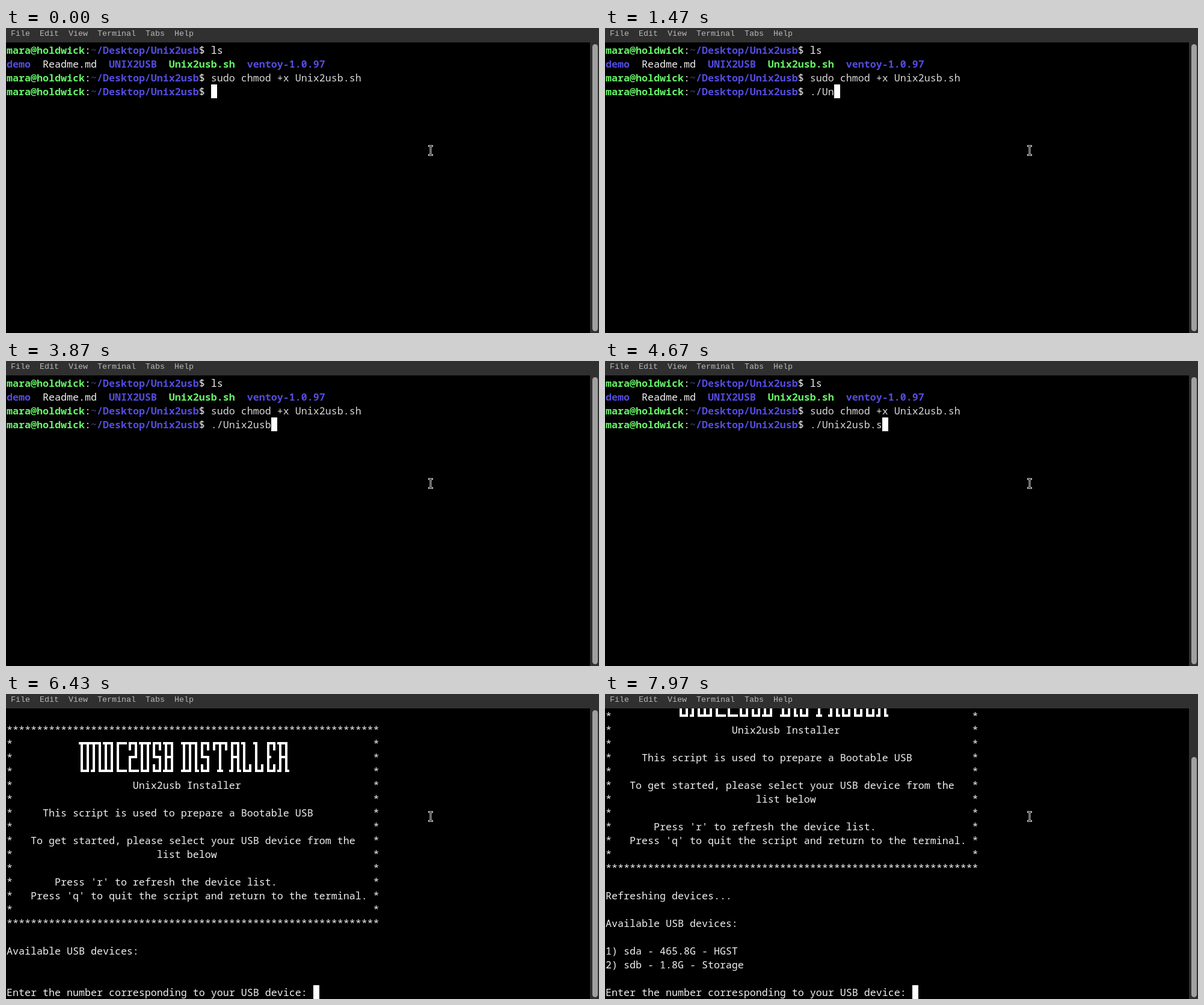
Recreate the animation shown at these times as an HTML page. Size 986 by 508 pixels, loop 8000 ms.

```html
<!DOCTYPE html>
<html lang="en">
<head>
<meta charset="utf-8">
<title>Terminal</title>
<style>
html, body { margin: 0; width: 100%; height: 100%; overflow: hidden; background: #303030; }
#stage { position: relative; width: 986px; height: 508px; overflow: hidden; }
#menu {
  position: absolute; left: 8px; top: 1px; margin: 0; color: #b8b8b8;
  font: 13.3333px/18px "Liberation Mono", monospace;
}
#term { position: absolute; left: 0; top: 24px; width: 971px; height: 484px; overflow: hidden; background: #000; }
#page { position: absolute; left: 1px; top: 1px; }
pre { margin: 0; color: #f0f0f0; font: 16.6667px/23px "Noto Sans Mono", monospace; font-variant-ligatures: none; }
pre div { height: 23px; }
b.user { color: #66f468; }
b.dir { color: #544ce0; }
i { font-style: normal; color: #d8d8d8; }
s { text-decoration: none; color: #484878; }
u { display: inline-block; width: 10px; height: 23px; vertical-align: top; background: #fff; }
#logo { position: absolute; left: 0; top: 46px; fill: none; stroke: #fff; stroke-width: 4; }
#thumb { position: absolute; left: 975px; width: 9px; border-radius: 4.5px; background: #a0a0a0; }
#mouse { position: absolute; left: 698px; top: 193px; fill: none; }
</style>
</head>
<body>
<div id="stage">
  <pre id="menu">File  Edit  View  Terminal  Tabs  Help</pre>
  <div id="term">
    <div id="page">
      <pre id="text"></pre>
      <svg id="logo" width="480" height="69"><path/></svg>
    </div>
  </div>
  <div id="thumb"></div>
  <svg id="mouse" width="16" height="22">
    <path d="M4 3.5H12M8 3.5V18.5M4 18.5H12" stroke="#d8d8d8" stroke-width="3"/>
    <path d="M5 3.5H11M8 3.5V18.5M5 18.5H11" stroke="#000"/>
  </svg>
</div>
<script>
const LOOP = 8000, LAUNCH = 5030, REFRESH = 7030;
const FIRST_KEY = 100, KEY_GAP = 400;
const COMMAND = './Unix2usb.sh';
const get = id => document.getElementById(id);

// Shell session
const dir = s => `<b class="dir">${s}</b>`;
const user = s => `<b class="user">${s}</b>`;
const prompt = user('mara@holdwick') + ':' + '<s>~</s>' + dir('/Desktop/Unix2usb') + '$ ';
const shell = typed => [
  prompt + 'ls',
  [dir('demo'), 'Readme.md', dir('UNIX2USB'), user('Unix2usb.sh'), dir('ventoy-1.0.97')].join('  '),
  prompt + '<i>sudo chmod +x Unix2usb.sh</i>',
  prompt + `<i>${typed}</i><u></u>`
];

// Installer screen
const stars = '*'.repeat(62);
const boxed = (col = 1, s = '') => ('*' + ' '.repeat(col - 1) + s).padEnd(61) + '*';
const banner = [
  '', stars, boxed(), boxed(), boxed(),
  boxed(21, 'Unix2usb Installer'),
  boxed(),
  boxed(6, 'This script is used to prepare a Bootable USB'),
  boxed(),
  boxed(4, 'To get started, please select your USB device from the'),
  boxed(25, 'list below'),
  boxed(),
  boxed(8, "Press 'r' to refresh the device list."),
  boxed(4, "Press 'q' to quit the script and return to the terminal."),
  boxed(), stars, ''
];
const heading = 'Available USB devices:';
const question = 'Enter the number corresponding to your USB device: <u></u>';
const empty = [...banner, heading, '', '', question];
const listed = [
  ...banner, 'Refreshing devices...', '', heading, '',
  '1) sda - 465.8G - HGST', '2) sdb - 1.8G - Storage', '', question
];

// Banner lettering: every box character is a set of arms from its cell centre
const lettering = [
  '┳┳┳┓┳┓┏━┏┓┳┳┏┓┳┓ ┳┳┓┏┓┏┳┓┏┓┓ ┓ ┏┓┳┓',
  '┃┃┃┃┃┃┃ ┏┛┃┃┗┓┣┫ ┃┃┃┗┓ ┃ ┣┫┃ ┃ ┣ ┣┫',
  '┗┛┛┗┻┛┗━┗━┗┛┗┛┻┛ ┻┛┗┗┛ ┻ ┛┗┗┛┗┛┗┛┛┗'
];
const arms = {
  '┳': 'lrd', '┻': 'lru', '┣': 'rud', '┫': 'lud', '━': 'lr', '┃': 'ud',
  '┏': 'rd', '┓': 'ld', '┗': 'ru', '┛': 'lu', ' ': ''
};
const strokes = {
  l: (x, y) => `M${x + 2} ${y}H${x - 5}`,
  r: (x, y) => `M${x - 2} ${y}H${x + 5}`,
  u: (x, y) => `M${x} ${y + 2}V${y - 11}`,
  d: (x, y) => `M${x} ${y - 2}V${y + 12}`
};
const logoPath = lettering.map((line, row) =>
  [...line].map((ch, col) =>
    [...arms[ch]].map(a => strokes[a](125 + col * 10, 11 + row * 23)).join('')
  ).join('')
).join('');
document.querySelector('#logo path').setAttribute('d', logoPath);

let shown = '';
function show(lines) {
  const html = lines.map(line => `<div>${line}</div>`).join('');
  if (html === shown) return;
  shown = html;
  const scroll = Math.max(0, lines.length - 21);
  get('text').innerHTML = html;
  get('page').style.top = 1 - scroll * 23 + 'px';
  get('logo').style.display = lines.length > 4 ? 'block' : 'none';
  const top = scroll ? 105 : 27;
  get('thumb').style.top = top + 'px';
  get('thumb').style.height = 505 - top + 'px';
}

function frame() {
  const t = performance.now() % LOOP;
  const keys = Math.max(0, Math.floor((t - FIRST_KEY) / KEY_GAP) + 1);
  show(t < LAUNCH ? shell(COMMAND.slice(0, keys)) : t < REFRESH ? empty : listed);
  requestAnimationFrame(frame);
}
frame();
</script>
</body>
</html>
```
